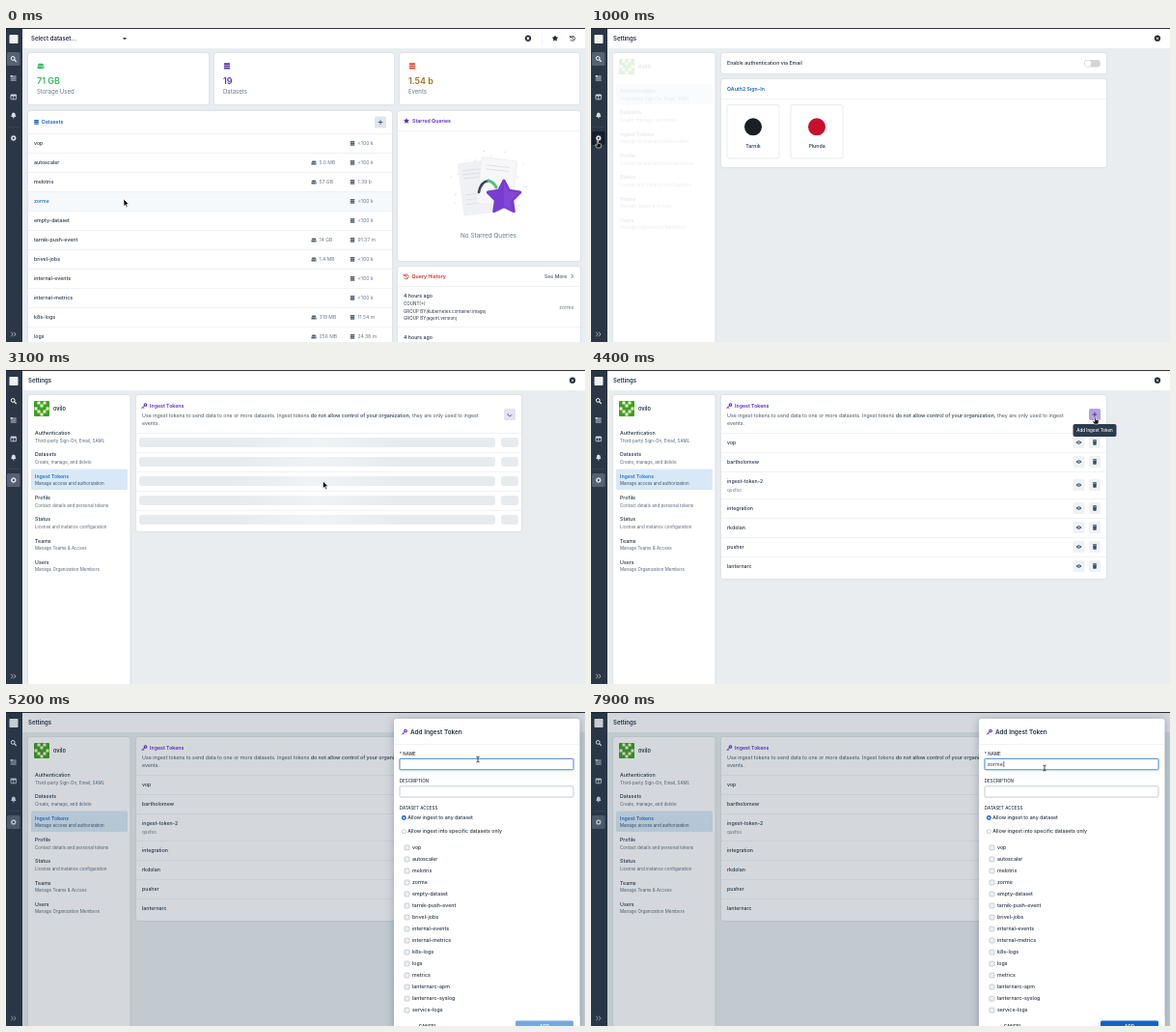
An HTML page that plays this animation: 600x325 px, repeating every 8 s.

```html
<!DOCTYPE html>
<html lang="en">
<head>
<meta charset="utf-8">
<title>Ingest tokens</title>
<style>
html, body { margin: 0; width: 100%; height: 100%; overflow: hidden; background: #e9edf0; }
svg { display: block; width: 100vw; height: 100vh; font-family: Inter, "Open Sans", sans-serif; }
.panel { filter: drop-shadow(0 .4px .8px rgba(50, 70, 90, .16)); }
.nav.on .label, .nav.on .sub { fill: #1560bd; }
.nav.on .sub { fill: #35506f; }
</style>
</head>
<body>
<svg id="stage" viewBox="0 0 600 325" preserveAspectRatio="none"></svg>
<script>
const INK = '#263445', SOFT = '#68778b', BLUE = '#1766bd', PURPLE = '#5a2dc4', LINE = '#e6eaee';
const esc = s => s.replace(/&/g, '&amp;').replace(/</g, '&lt;');

// y is the middle of the capitals
const text = (x, y, s, size = 5.25, weight = 500, fill = INK, more = '') =>
  `<text x="${x}" y="${y + size * .36}" font-size="${size}" font-weight="${weight}" fill="${fill}" ${more}>${esc(s)}</text>`;
const mid = 'text-anchor="middle"';
const rect = (x, y, w, h, fill, r = 0, more = '') =>
  `<rect x="${x}" y="${y}" width="${w}" height="${h}" rx="${r}" fill="${fill}" ${more}/>`;
const circle = (x, y, r, fill, more = '') => `<circle cx="${x}" cy="${y}" r="${r}" fill="${fill}" ${more}/>`;
const stroke = (d, color, w = 1, more = '') =>
  `<path d="${d}" fill="none" stroke="${color}" stroke-width="${w}" stroke-linecap="round" stroke-linejoin="round" ${more}/>`;
const shape = (d, fill, more = '') => `<path d="${d}" fill="${fill}" ${more}/>`;
const group = (id, body, more = '') => `<g id="${id}" ${more}>${body}</g>`;
const at = (x, y, body) => `<g transform="translate(${x} ${y})">${body}</g>`;
const panel = (x, y, w, h) => rect(x, y, w, h, '#fff', 2.5, 'class="panel"');
const rule = (x, y, w) => rect(x, y, w, .6, LINE);

const stack = (x, y, c, k = 1) => `<g transform="translate(${x} ${y}) scale(${k})">` +
  [-2.5, -.8, .9].map(d => rect(-2.4, d, 4.8, 1.4, c, .65)).join('') + '</g>';
const drive = (x, y, c, k = 1) => `<g transform="translate(${x} ${y}) scale(${k})">` +
  shape('M-1.6-2H1.6L2.6 0H-2.6Z', c) + rect(-2.6, .3, 5.2, 1.8, c, .6) + circle(1.4, 1.2, .4, '#fff') + '</g>';
const key = (x, y, c) => at(x, y, circle(1, -1, 1.3, 'none', `stroke="${c}" stroke-width="1.1"`) +
  stroke('M0 0L-2.6 2.6M-1.6 1.6L-.8 2.4', c, 1));
const star = (r, n = 5) => 'M' + Array.from({ length: n * 2 }, (_, i) => {
  const a = Math.PI * (i / n - .5), q = i % 2 ? r * .52 : r;
  return (q * Math.cos(a)).toFixed(2) + ' ' + (q * Math.sin(a)).toFixed(2);
}).join('L') + 'Z';
const history = (x, y, c) => at(x, y, stroke('M-2-1.3A2.5 2.5 0 1 1-1.8 1.7M-2.4-2.3V-.9H-1M.1-1.2V.2L1 .9', c, .8));
const closer = (x, y) => at(x, y, circle(0, 0, 3.1, '#1d2733') + stroke('M-1-1L1 1M1-1L-1 1', '#fff', .8));

const sets = ['vop', 'autoscaler', 'melotrix', 'zorme', 'empty-dataset', 'tarnik-push-event', 'brivel-jobs',
  'internal-events', 'internal-metrics', 'k8s-logs', 'logs', 'metrics', 'lanternarc-apm', 'lanternarc-syslog', 'service-logs'];
const sizes = { 1: '5.0 MB', 2: '57 GB', 5: '14 GB', 6: '1.4 MB', 9: '319 MB', 10: '256 MB' };
const counts = { 2: '1.39 b', 5: '91.37 m', 9: '11.54 m', 10: '24.38 m' };

function home() {
  const card = (x, w, icon, n, label, c) => panel(x, 26, w, 53) + icon(x + 13, 39.5, c, 1.35) +
    text(x + 9, 55, n, 9, 600, c) + text(x + 9, 66, label, 6, 400, SOFT);
  let s = rect(17, 0, 583, 21, '#fff') + text(26, 10.5, 'Select dataset...', 6, 600) +
    shape('M121 10H125L123 12.2Z', INK) +
    at(541, 10.7, circle(0, 0, 2.2, 'none', 'stroke="#1d2733" stroke-width="1.9"') + stroke('M-2-2L-1-1M2 2L1 1M-2 2L-1 1M2-2L1-1', '#fff', .5)) +
    rect(555, 5, .5, 12, LINE) + at(569, 10.8, shape(star(3.4), '#1d2733')) + history(587, 10.7, '#1d2733');
  s += card(23, 187, drive, '71 GB', 'Storage Used', '#3cb76a') + card(216, 186, stack, '19', 'Datasets', '#5a34bd') +
    card(408, 186, (x, y, c) => stack(x, y, '#d65428', 1.35), '1.54 b', 'Events', '#a87024');
  s += panel(23, 86, 377, 250) + stack(31.5, 97.5, BLUE) + text(37, 97.5, 'Datasets', 5.25, 600, BLUE) +
    rect(382, 91.5, 12, 12, '#dfe6ef', 1.5) + stroke('M386 97.5H390M388 95.5V99.5', '#274569', .8);
  s += rect(23, 0, 377, 20, '#f6f9fb', 0, 'id="rowHover"');
  sets.slice(0, 11).forEach((name, i) => {
    const y = 119.4 + i * 20;
    s += rule(23, y - 10, 377) + text(29, y, name, 5.25, 500, INK, `class="row"`);
    if (sizes[i]) s += drive(319, y, '#536174') + text(324.5, y, sizes[i], 5.1, 400, SOFT);
    s += stack(359, y, '#536174') + text(364.5, y, counts[i] || '<100 k', 5.1, 400, SOFT);
  });
  s += panel(406, 86, 189, 155) + at(415, 96.3, shape(star(3), PURPLE)) +
    text(421, 96, 'Starred Queries', 5.25, 600, PURPLE) + rule(406, 106, 189);
  const dots = Array.from({ length: 26 }, (_, i) => {
    const a = i * 2.4, q = 22 + i * 37 % 17;
    return circle(500 + q * 1.15 * Math.cos(a), 160 + q * Math.sin(a), .55, ['#c9b5ee', '#a9dfba', '#d5dae3'][i % 3]);
  }).join('');
  s += dots + `<g transform="rotate(-7 487 165)">${rect(471, 138, 32, 55, '#f0f1f4', 1)}` +
    [146, 150, 154, 171, 176, 181].map(y => rect(475, y, 21, 1, '#dcdfe5')).join('') + '</g>' +
    `<g transform="rotate(7 512 160)">${rect(490, 136, 37, 48, '#f7f7f9', 1, 'stroke="#e4e5eb" stroke-width=".5"')}` +
    [143, 147].map(y => rect(496, y, 24, 1, '#dee0e6')).join('') + '</g>' +
    stroke('M490 170Q492 159 500 158', '#3e4653', 2.6) + stroke('M500 158Q506 160 508 165', '#59bf78', 3) +
    at(516, 175.5, shape(star(17.5), '#7a3bd2', 'stroke="#7a3bd2" stroke-width="3" stroke-linejoin="round"') +
      shape('M0-17L4-7 15-5 7 4 8 13 0 9Z', '#9251df', 'opacity=".45"')) +
    text(500, 215, 'No Starred Queries', 6.4, 400, SOFT, mid);
  s += panel(406, 247, 189, 90) + history(414.5, 257.3, '#cf3526') + text(420.5, 257, 'Query History', 5.25, 600, '#cf3526') +
    text(558, 257, 'See More', 5.1, 500, '#4b596b') + stroke('M586 255.3L587.7 257L586 258.7', '#4b596b', .8) + rule(406, 267, 189) +
    text(412, 277.5, '4 hours ago') + text(412, 285.3, 'COUNT(*)', 4.5, 400) +
    text(412, 293, 'GROUP BY(kubernetes.container.image)', 4.5, 400) + text(412, 300.5, 'GROUP BY(agent.version)', 4.5, 400) +
    text(588.5, 289, 'zorme', 5.1, 400, SOFT, 'text-anchor="end"') + rule(406, 309, 189) + text(412, 320, '4 hours ago');
  return s;
}

function avatar(x, y) {
  const bits = ['101', '110', '011', '101', '110'];
  let s = rect(x, y, 16, 16, '#3f9f22', 1);
  bits.forEach((b, r) => [0, 1, 2, 1, 0].forEach((c, i) => {
    if (b[c] === '0') s += rect(x + .5 + i * 3, y + .5 + r * 3, 3, 3, '#f1f5d2');
  }));
  return s;
}

const items = [['Authentication', 'Third-party Sign-On, Email, SAML'], ['Datasets', 'Create, manage, and delete'],
  ['Ingest Tokens', 'Manage access and authorization'], ['Profile', 'Contact details and personal tokens'],
  ['Status', 'License and instance configuration'], ['Teams', 'Manage Teams & Access'], ['Users', 'Manage Organization Members']];
const navY = i => 58 + i * 22.3;

function nav() {
  return avatar(29, 32) + text(49, 40, 'ovilo', 5.6, 600) +
    rect(26, 0, 100, 21.3, '#f1f5f8', 1.5, 'id="navHover"') + rect(26, 0, 100, 21.3, '#d9e8f6', 1.5, 'id="navOn"') +
    items.map(([a, b], i) => '<g class="nav">' + text(30, navY(i) + 7.3, a, 5.25, 500, INK, 'class="label"') +
      text(30, navY(i) + 15, b, 4.5, 400, '#57667a', 'class="sub"') + '</g>').join('');
}

function auth() {
  const box = (x, c, name) => rect(x, 79.5, 54, 55.5, '#fff', 2, 'stroke="#dfe4e9" stroke-width=".7"') +
    circle(x + 27, 102.3, 9, c) + text(x + 27, 122, name, 5.25, 500, INK, mid);
  return panel(135, 26, 399, 21) + text(141, 36.4, 'Enable authentication via Email') +
    rect(511, 33, 17, 7.4, '#d2d5d8', 3.7) + circle(515, 36.7, 3.2, '#fff') +
    panel(135, 53, 399, 91) + text(141, 63.2, 'OAuth2 Sign-In', 5.25, 600, BLUE) + rule(135, 73, 399) +
    box(141, '#1b1f23', 'Tarnik') + box(207, '#c8102e', 'Plunda');
}

const bars = () => panel(135, 26, 399, 141) + [0, 1, 2, 3, 4].map(i => {
  const y = 70 + i * 20;
  return rect(138, y, 369, 10, 'url(#shine)', 3) + rect(513, y, 18, 10, 'url(#shine)', 3) + (i ? rule(135, y - 5, 399) : '');
}).join('');

function tokens() {
  const rows = [['vop', 75], ['bartholomew', 95], ['ingest-token-2', 119, 'quxfoo'], ['integration', 143],
    ['rkdolan', 163], ['pusher', 183], ['lanternarc', 203]];
  return panel(135, 26, 399, 190) + rows.map(([name, y, sub], i) =>
    (i ? rule(135, y - (sub ? 14 : 10), 399) : '') + text(141, sub ? y - 4.2 : y, name) +
    (sub ? text(141, y + 5, sub, 4.5, 400, SOFT) : '') +
    rect(499.5, y - 6, 12, 12, '#eff2f5', 1.5) + rect(516, y - 6, 12, 12, '#eff2f5', 1.5) +
    at(505.5, y, shape('M-3 0Q0-3.6 3 0Q0 3.6-3 0Z', '#3d4b5d') + circle(0, 0, 1.1, '#eff2f5') + circle(0, 0, .6, '#3d4b5d')) +
    at(522, y, rect(-2.2, -2.6, 4.4, .8, '#3d4b5d') + rect(-.8, -3, 1.6, .8, '#3d4b5d') + shape('M-1.9-1.4H1.9L1.6 2.8H-1.6Z', '#3d4b5d'))
  ).join('');
}

const tokenHead = () => key(143.5, 37, PURPLE) + text(149, 37, 'Ingest Tokens', 5.25, 600, PURPLE) +
  `<text x="141" y="49.3" font-size="5.25" fill="#465468">Use ingest tokens to send data to one or more datasets. Ingest tokens <tspan font-weight="600">do not allow control of your organization</tspan>, they are only used to ingest</text>` +
  text(141, 55, 'events.', 5.25, 400, '#465468') + rule(135, 65, 399) +
  rect(516, 40, 12, 12, '#e2dcf3', 1.5, 'id="addBtn"') +
  group('spinner', stroke('M520 45.5A2.1 2.1 0 0 0 524 46.5', PURPLE, .8)) +
  group('plus', stroke('M520 46H524M522 44V48', '#3f2494', .8));

function drawer() {
  const field = (y, id) => rect(408, y, 180, 11.3, '#fff', 1.2, `id="${id}" stroke="#b8c1cb" stroke-width=".8"`);
  return rect(402, 7, 192.5, 340, '#fff', 3, 'style="filter:drop-shadow(0 1px 4px rgba(20,35,55,.3))"') +
    key(413, 20.5, PURPLE) + text(419, 20.5, 'Add Ingest Token', 6.4, 600) + rule(402, 33, 192.5) +
    text(407.8, 43.3, '* NAME', 4.5, 500) +
    rect(407, 47.4, 182, 13.3, '#cfe2f8', 2, 'id="glow"') + field(48.4, 'nameBox') +
    text(411, 54, '', 5.25, 400, INK, 'id="typed"') + rect(411, 51, .6, 6.2, '#111', 0, 'id="caret"') +
    text(407.8, 71, 'DESCRIPTION', 4.5, 500) + field(76.8, 'descBox') +
    text(407.8, 99.5, 'DATASET ACCESS', 4.5, 500) +
    circle(412.3, 109.5, 2.4, '#1767cf') + circle(412.3, 109.5, .9, '#fff') + text(416.3, 109.3, 'Allow ingest to any dataset') +
    circle(412.3, 123.7, 2.1, '#fff', 'stroke="#a5afba" stroke-width=".6"') + text(416.3, 123.5, 'Allow ingest into specific datasets only') +
    sets.map((name, i) => rect(413, 137.9 + i * 12.02, 5, 5, '#eef1f4', 1, 'stroke="#a9b3be" stroke-width=".6"') +
      text(421, 140.3 + i * 12.02, name)).join('') +
    rect(402, 314.5, 192.5, 20, '#fff') + text(437, 325, 'CANCEL', 4.5, 600, INK, mid) +
    rect(528, 319.6, 60, 14, '#78a7df', 1.5, 'id="submit"') + text(558, 325.2, 'ADD', 4.5, 600, '#fff', mid);
}

function sidebar() {
  const c = '#d6dce3';
  return rect(0, 0, 17, 325, '#2b3747') + rect(3.5, 7, 9, 9, '#eef1f4', .8) +
    rect(1, 25, 13.5, 14, '#566273', 1.5, 'id="sideSearch"') + rect(1, 107, 13.5, 14, '#566273', 1.5, 'id="sideGear"') +
    rect(2, 102, 12, .5, '#465264') +
    circle(7.2, 31.4, 1.9, 'none', `stroke="#fff" stroke-width="1"`) + stroke('M8.7 32.9L10.4 34.6', '#fff', 1.1) +
    [49.6, 51.6, 53.6].map(y => rect(4.7, y, 6, .9, c)).join('') + rect(4.7, 49, 2, 1.5, c) +
    rect(5, 69, 5.6, 4.8, 'none', .5, `stroke="${c}" stroke-width=".8"`) + rect(5, 69, 5.6, 1.5, c) + rect(7.5, 70, .7, 4, c) +
    at(7.8, 90.6, shape('M0-3C2-2.7 2-1 2 .2L2.7 1.5H-2.7L-2 .2C-2-1-2-2.7 0-3Z', c) + circle(0, 2.2, .8, c)) +
    at(7.8, 114, shape(star(3.4, 8), c) + circle(0, 0, 2.5, c) + circle(0, 0, 1, '#2b3747')) +
    stroke('M5.5 315L7.2 317L5.5 319M8.3 315L10 317L8.3 319', c, .7);
}

const cursors = group('arrow', shape('M0 0V7.4L1.7 5.9 2.8 8.4 4 7.9 2.9 5.4H5.2Z', '#000', 'stroke="#fff" stroke-width=".6"')) +
  group('hand', shape('M-.7 0Q0-.9.6 0V2.4L3.3 3Q3.9 3.2 3.7 4L3 7H-.9L-2.8 4.5Q-2.7 3.5-1.8 3.9L-.7 4.6Z', '#111', 'stroke="#fff" stroke-width=".6"')) +
  group('beam', stroke('M-1.3-3Q0-3 0-2V2Q0 3-1.3 3M1.3-3Q0-3 0-2M0 2Q0 3 1.3 3', '#111', .7));

const stage = document.getElementById('stage');
stage.innerHTML = `<defs><linearGradient id="shine" gradientUnits="userSpaceOnUse" x1="0" x2="170" y1="0" y2="0">
  <stop offset="0" stop-color="#e7ebee"/><stop offset=".5" stop-color="#f0f3f5"/><stop offset="1" stop-color="#e7ebee"/></linearGradient></defs>` +
  rect(0, 0, 600, 325, '#e9edf0') + group('home', home()) +
  group('settings', rect(17, 0, 583, 21, '#fff') + text(23, 10.6, 'Settings', 6, 600) + closer(587, 10.7) +
    panel(23, 26, 105.5, 310) + group('nav', nav()) + group('auth', auth()) +
    group('ingest', group('bars', bars()) + group('list', tokens()) + tokenHead())) +
  sidebar() + group('tip', rect(499.5, 56, 45, 13, '#2d3b4e', 2) + text(522, 62.4, 'Add Ingest Token', 4.5, 500, '#fff', mid)) +
  rect(0, 0, 600, 325, '#1e3248', 0, 'id="shade"') + group('drawer', drawer()) +
  rect(0, 0, 600, .9, '#171e28') + group('cursor', cursors);

const $ = id => document.getElementById(id);
const show = (id, on) => $(id).setAttribute('visibility', on ? 'inherit' : 'hidden');
const set = (id, name, v) => $(id).setAttribute(name, v);
const clamp = v => Math.max(0, Math.min(1, v));
const rows = [...document.querySelectorAll('.row')], navs = [...document.querySelectorAll('.nav')];

// time, x, y of the pointer
const track = [[0, 122, 177], [100, 122, 177], [900, 7, 116], [1000, 7, 117], [1400, 167, 159], [1800, 167, 159],
  [2500, 80, 113], [2700, 80, 113], [3100, 328.5, 115], [3500, 345, 109], [3600, 345, 109], [4200, 522.5, 49],
  [4600, 522.5, 49], [5200, 489, 49], [7400, 489, 53], [7800, 470, 58], [8000, 470, 58]];
const typing = [6700, 6800, 7000, 7100, 7200], word = 'zorme';

function pointer(t) {
  const i = track.findIndex((k, n) => n && t <= k[0]), [a, ax, ay] = track[i - 1], [b, bx, by] = track[i];
  const p = (t - a) / (b - a), e = p * p * (3 - 2 * p);
  return [ax + (bx - ax) * e, ay + (by - ay) * e];
}

function draw(t) {
  const [x, y] = pointer(t), inHome = t < 1000, ingest = t >= 2700, loaded = t >= 3400;
  show('home', inHome);
  show('settings', !inHome);
  show('auth', !ingest);
  show('ingest', ingest);
  show('bars', !loaded);
  show('list', loaded);
  show('spinner', !loaded);
  show('plus', loaded);

  const row = inHome && x > 23 ? Math.floor((y + 2.5 - 109.4) / 20) : -1;
  show('rowHover', row >= 0);
  set('rowHover', 'y', 109.4 + row * 20);
  rows.forEach((r, i) => r.setAttribute('fill', i === row ? BLUE : INK));

  const picked = ingest ? 2 : 0, over = !inHome && x > 26 && x < 126 && t > 1400 ? Math.floor((y - 58) / 22.3) : -1;
  set('nav', 'opacity', clamp(.13 + (t - 1000) / 440));
  set('navOn', 'y', navY(picked));
  set('navHover', 'y', navY(over));
  show('navHover', over >= 0);
  navs.forEach((n, i) => n.classList.toggle('on', i === picked));

  show('sideSearch', t < 1200);
  show('sideGear', t >= 800);
  set('sideGear', 'fill', t < 1200 ? '#151e2a' : '#566273');
  set('shine', 'gradientTransform', `translate(${138 + (t - 2700) * .25} 0)`);
  set('spinner', 'transform', `rotate(${(t - 3100) * .45} 522 46)`);

  const onAdd = t >= 4100 && t < 4800;
  set('addBtn', 'fill', onAdd ? '#b5a2e2' : loaded ? '#e2dcf3' : '#e4e2f0');
  show('tip', t >= 4300 && t < 4600);

  const slide = 1 - (1 - clamp((t - 4500) / 500)) ** 3;
  set('shade', 'opacity', .19 * slide);
  show('drawer', t > 4500);
  set('drawer', 'transform', `translate(${200 * (1 - slide)} 0)`);
  const focus = t >= 4900;
  show('glow', focus);
  set('nameBox', 'stroke', focus ? '#2f7bd8' : '#b8c1cb');

  const typed = $('typed');
  typed.textContent = word.slice(0, typing.filter(k => t >= k).length);
  const blink = t >= 6600 ? 1 : t < 5400 ? 0 : clamp(.5 + 1.6 * Math.sin((t - 5450) / 1000 * 2 * Math.PI));
  set('caret', 'opacity', blink);
  set('caret', 'x', 411 + (typed.textContent ? typed.getComputedTextLength() + .9 : 0));
  set('submit', 'fill', t >= typing[0] ? '#1763c4' : '#78a7df');

  const hand = (t >= 800 && t < 1200) || (over >= 0 && t < 2900) || onAdd, beam = t >= 5000;
  show('hand', hand);
  show('beam', beam && (t < 5500 || t >= 7500));
  show('arrow', !hand && !beam);
  set('cursor', 'transform', `translate(${x} ${y})`);
}

const start = performance.now();
function tick(now) {
  draw(Math.floor(Math.max(0, now - start) % 8000 / 100) * 100);
  requestAnimationFrame(tick);
}
draw(0);
requestAnimationFrame(tick);
</script>
</body>
</html>
```
